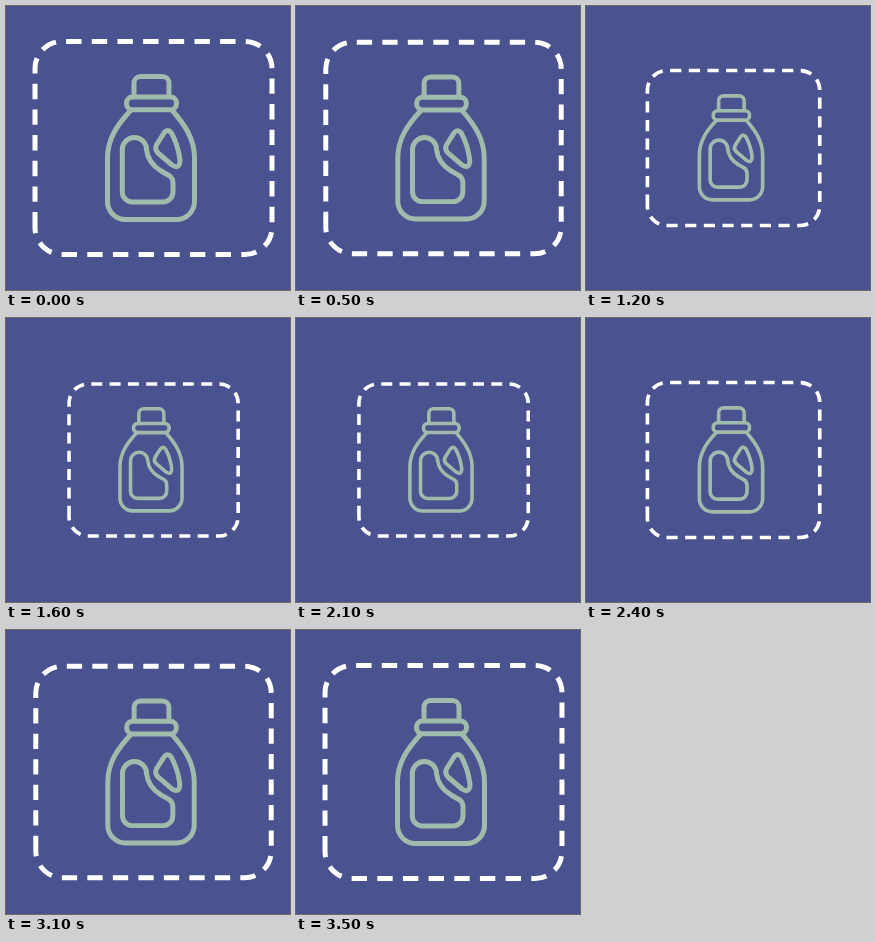
An HTML page that plays this animation: 284 by 284 pixels, repeating every 3600 ms.

```html
<!DOCTYPE html>
<html lang="en">
<head>
<meta charset="utf-8">
<title>Detergent bottle</title>
<style>
  html, body { margin: 0; width: 100%; height: 100%; overflow: hidden; background: #4a528f; }
  svg { display: block; width: 100%; height: 100%; }
</style>
</head>
<body>
<svg viewBox="0 0 284 284" fill="none" stroke-width="5" stroke-linejoin="round">
  <path id="border" stroke="#fff" stroke-dasharray="15.4 10.27"
    d="M29 221.5V62.5A27 27 0 0 1 56 35.5H239A27 27 0 0 1 266 62.5V221.5A27 27 0 0 1 239 248.5H56A27 27 0 0 1 29 221.5"/>
  <g id="bottle" stroke="#a0baac">
    <path d="M128 91V77A6.500 6.500 0 0 1 134.500 70.500H156.500A6.500 6.500 0 0 1 163 77V91"/>
    <rect x="120.500" y="91" width="50" height="12.800" rx="6"/>
    <path d="M125 104C112 118 101.500 132 101.500 152V195.500A18 18 0 0 0 119.500 213.500H170.500A18 18 0 0 0 188.500 195.500V152C188.500 132 178 118 166 104"/>
    <path d="M116.300 143.500A12.100 12.100 0 0 1 140.500 143.500C141.500 153 147 160 155 165L163 169.500Q167 172 167 177V186A10 10 0 0 1 157 196H126.300A10 10 0 0 1 116.300 186Z"/>
    <path d="M158 127L151 138Q148 143 152 147L166 159Q174 164 174 154Q172 139 165.500 127Q161.500 122 158 127Z"/>
  </g>
</svg>
<script>
  const LOOP = 3600, STEP = 100, SMALL = 0.713;
  const border = document.getElementById('border');
  const bottle = document.getElementById('bottle');

  const easeInOutExpo = p =>
    p <= 0 ? 0 : p >= 1 ? 1 :
    p < 0.5 ? 2 ** (20 * p - 10) / 2 : 1 - 2 ** (10 - 20 * p) / 2;

  function scaleAbout(el, x, y, s) {
    el.setAttribute('transform', `translate(${x} ${y}) scale(${s}) translate(${-x} ${-y})`);
  }

  function draw(now) {
    const t = Math.floor(now % LOOP / STEP) * STEP;
    const p = 1 - Math.abs(2 * t / LOOP - 1); // shrink, then grow back
    const s = 1 - (1 - SMALL) * easeInOutExpo(p);
    scaleAbout(border, 147.8, 142, s);
    scaleAbout(bottle, 145, 141.5, s);
    requestAnimationFrame(draw);
  }
  draw(performance.now());
</script>
</body>
</html>
```
